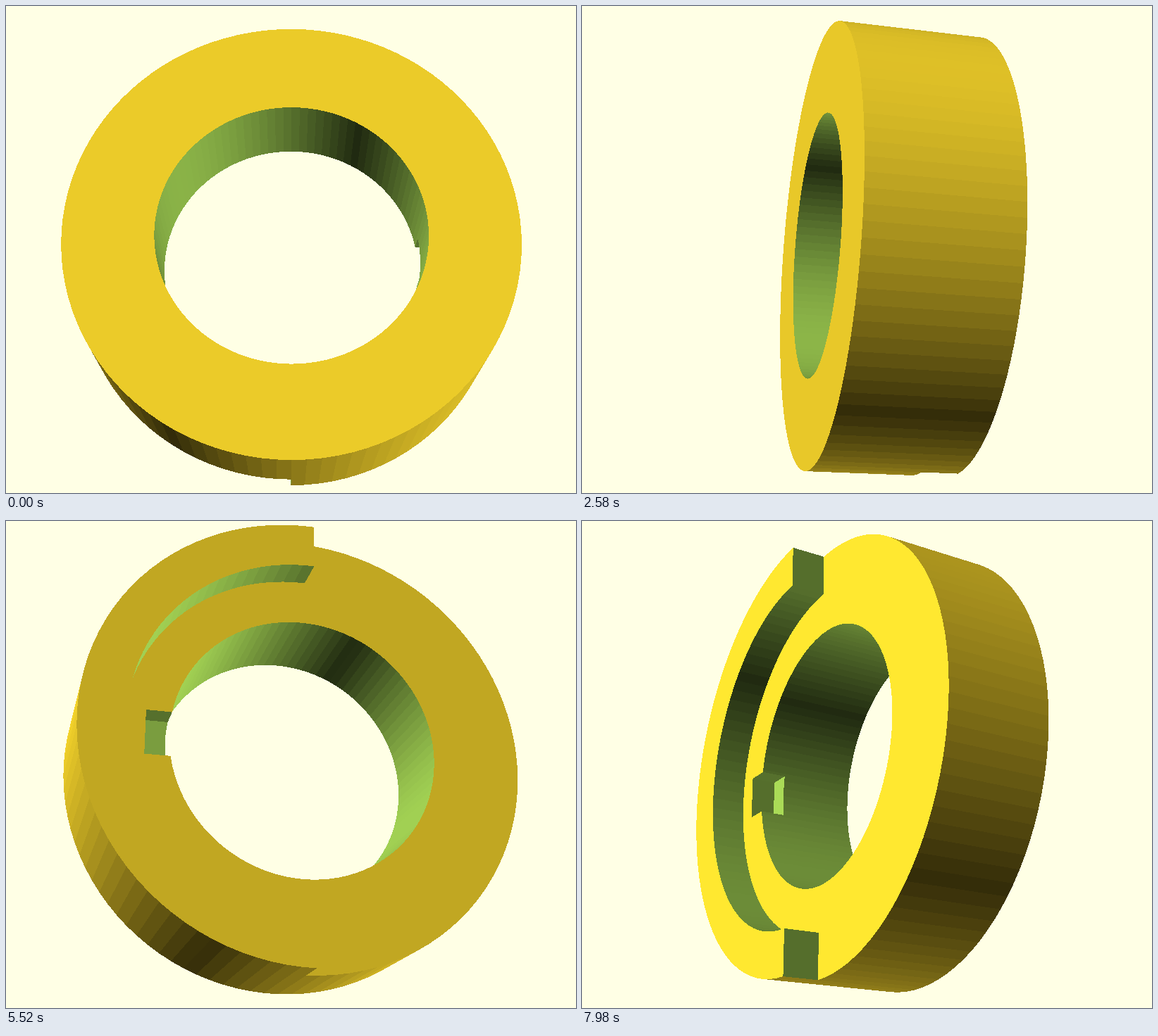
An HTML page with a canvas for the animation above (8 s loop, 809 by 692 pixels).

```html
<!DOCTYPE html>
<html lang="en">
<head>
<meta charset="utf-8">
<title>Rotating collar</title>
<style>
  html, body { margin: 0; width: 100%; height: 100%; overflow: hidden; background: #ffffe5; }
  canvas { display: block; }
</style>
</head>
<body>
<canvas id="stage" width="809" height="692"></canvas>
<script>
const canvas = document.getElementById('stage');
const { width: W, height: H } = canvas;
const ctx = canvas.getContext('2d');
const image = ctx.createImageData(W, H);
const pixels = new Uint32Array(image.data.buffer);
const depth = new Float32Array(W * H);

const YELLOW = [249, 215, 44], GREEN = [157, 203, 81];
const pack = ([r, g, b]) => (255 << 24 | b << 16 | g << 8 | r) >>> 0;
const BACKGROUND = pack([255, 255, 229]);

const LOOP = 8000, STEP_MS = 60, STEP_ANGLE = Math.PI / 100;
const START_ANGLE = -0.0044;
const TILT = Math.PI / 9, DISTANCE = 5.556;
const FOCAL = H / 2 / Math.tan(Math.PI / 16);
const CENTER_X = 405, CENTER_Y = H / 2;
const AMBIENT = 0.205;

// Solid, in units of the outer radius; z runs along the ring's axis.
const HOLE = 0.597, LIP = 0.8, SLOT = 0.7, SLOT_HALF = 0.1;
const FRONT = 0.239, BACK = -0.239, RIM = -0.402, SLOT_FLOOR = -0.12;

const FACETS = 100, FACET = 2 * Math.PI / FACETS;
const slotAngle = Math.asin(SLOT_HALF / HOLE);
const angles = Array.from({ length: FACETS + 1 }, (_, i) => (i - FACETS / 2) * FACET)
  .concat(-slotAngle, -slotAngle, slotAngle, slotAngle)
  .sort((a, b) => a - b);

// Points on a regular polygon, so that extra angles stay on its edges.
const ring = radius => angles.map(a => {
  const middle = (Math.floor(a / FACET) + 0.5) * FACET;
  const r = radius * Math.cos(FACET / 2) / Math.cos(a - middle);
  return [r * Math.cos(a), r * Math.sin(a)];
});
const outer = ring(1), lip = ring(LIP), hole = ring(HOLE);
const slotStart = angles.indexOf(-slotAngle), slotEnd = angles.indexOf(slotAngle);
const slotted = hole.map(([x, y], i) => i > slotStart && i <= slotEnd ? [SLOT, y] : [x, y]);

const quads = [];
const raised = i => Math.abs(angles[i] + angles[i + 1]) < Math.PI;
const flat = i => !raised(i);

function strip(a, za, b, zb, color, keep = () => true) {
  for (let i = 0; i < angles.length - 1; i++) {
    if (!keep(i)) continue;
    const points = [[...a[i], za], [...a[i + 1], za], [...b[i + 1], zb], [...b[i], zb]];
    quads.push({ points, color });
  }
}
function endCap(y0, y1) {
  quads.push({ points: [[0, y0, BACK], [0, y0, RIM], [0, y1, RIM], [0, y1, BACK]], color: GREEN });
}

strip(outer, FRONT, hole, FRONT, YELLOW);
strip(outer, BACK, outer, FRONT, YELLOW);
strip(outer, RIM, outer, BACK, YELLOW, raised);
strip(slotted, BACK, lip, BACK, YELLOW);
strip(lip, BACK, outer, BACK, YELLOW, flat);
strip(lip, RIM, outer, RIM, YELLOW, raised);
strip(lip, BACK, lip, RIM, GREEN, raised);
strip(hole, FRONT, hole, SLOT_FLOOR, GREEN);
strip(slotted, SLOT_FLOOR, slotted, BACK, GREEN);
strip(hole, SLOT_FLOOR, slotted, SLOT_FLOOR, GREEN);
endCap(1, LIP);
endCap(-LIP, -1);

const sub = (a, b) => [a[0] - b[0], a[1] - b[1], a[2] - b[2]];
const dot = (a, b) => a[0] * b[0] + a[1] * b[1] + a[2] * b[2];
const cross = (a, b) => [
  a[1] * b[2] - a[2] * b[1],
  a[2] * b[0] - a[0] * b[2],
  a[0] * b[1] - a[1] * b[0],
];

function toEye([x, y, z], cosYaw, sinYaw) {
  const across = x * cosYaw - z * sinYaw;
  const toward = x * sinYaw + z * cosYaw;
  return [
    across,
    y * Math.cos(TILT) + toward * Math.sin(TILT),
    toward * Math.cos(TILT) - y * Math.sin(TILT),
  ];
}

function project([x, y, z]) {
  const w = 1 / (DISTANCE - z);
  return { x: CENTER_X + FOCAL * x * w, y: CENTER_Y - FOCAL * y * w, w };
}

function shade(color, normal) {
  const facing = (normal[1] + normal[2] - normal[0]) / Math.sqrt(3) / Math.hypot(...normal);
  const light = AMBIENT + Math.abs(facing);
  return pack(color.map(c => Math.min(255, Math.round(c * light))));
}

function fillTriangle(a, b, c, color) {
  const abx = b.x - a.x, aby = b.y - a.y, acx = c.x - a.x, acy = c.y - a.y;
  const area = abx * acy - aby * acx;
  if (Math.abs(area) < 1e-9) return;
  const wx = ((b.w - a.w) * acy - (c.w - a.w) * aby) / area;
  const wy = ((c.w - a.w) * abx - (b.w - a.w) * acx) / area;
  const edges = [[a, b], [b, c], [c, a]];
  const top = Math.max(0, Math.ceil(Math.min(a.y, b.y, c.y) - 0.5));
  const bottom = Math.min(H, Math.ceil(Math.max(a.y, b.y, c.y) - 0.5));

  for (let row = top; row < bottom; row++) {
    const y = row + 0.5;
    let left = Infinity, right = -Infinity;
    for (const [p, q] of edges) {
      if ((p.y <= y) === (q.y <= y)) continue;
      const x = p.x + (q.x - p.x) * (y - p.y) / (q.y - p.y);
      left = Math.min(left, x);
      right = Math.max(right, x);
    }
    const end = Math.min(W, Math.ceil(right - 0.5));
    for (let col = Math.max(0, Math.ceil(left - 0.5)); col < end; col++) {
      const w = a.w + wx * (col + 0.5 - a.x) + wy * (y - a.y);
      const i = row * W + col;
      if (w > depth[i]) {
        depth[i] = w;
        pixels[i] = color;
      }
    }
  }
}

function render(yaw) {
  const cosYaw = Math.cos(yaw), sinYaw = Math.sin(yaw);
  pixels.fill(BACKGROUND);
  depth.fill(0);
  for (const { points, color } of quads) {
    const eye = points.map(p => toEye(p, cosYaw, sinYaw));
    const normal = cross(sub(eye[2], eye[0]), sub(eye[3], eye[1]));
    if (dot(normal, sub([0, 0, DISTANCE], eye[0])) <= 1e-12) continue;
    const [a, b, c, d] = eye.map(project);
    const tone = shade(color, normal);
    fillTriangle(a, b, c, tone);
    fillTriangle(a, c, d, tone);
  }
  ctx.putImageData(image, 0, 0);
}

let shown = -1;
function tick() {
  const step = Math.floor(performance.now() % LOOP / STEP_MS);
  if (step !== shown) {
    shown = step;
    render(START_ANGLE + step * STEP_ANGLE);
  }
  requestAnimationFrame(tick);
}
tick();
</script>
</body>
</html>
```
